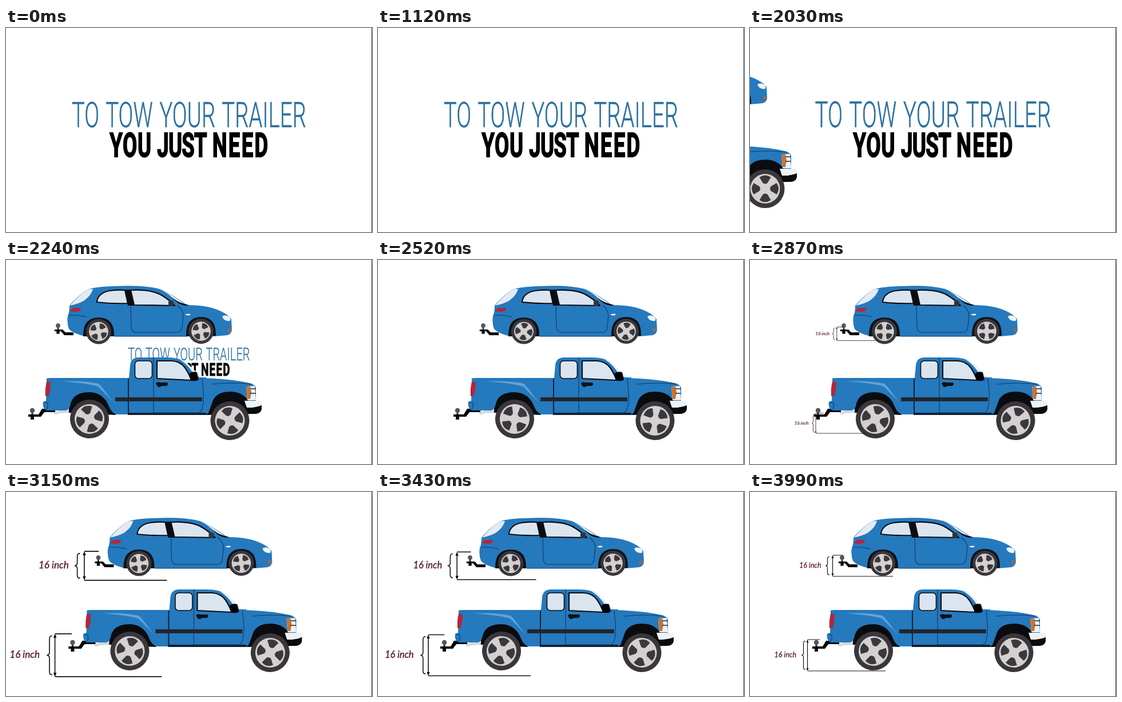
Recreate the animation shown at these times as an HTML page. Size 640 px wide and 358 px high, loop 4060 ms.

```html
<!DOCTYPE html>
<html lang="en">
<head>
<meta charset="utf-8">
<title>Tow your trailer</title>
<style>
  html, body { margin: 0; width: 100%; height: 100%; overflow: hidden; background: #fff; }
  svg { display: block; width: 100vw; height: 100vh; }
  .light, .bold { font-family: Roboto, "Liberation Sans", sans-serif; text-anchor: middle; }
  .light { font-size: 62px; font-weight: 300; letter-spacing: .2px; word-spacing: 3.7px;
    fill: #2a709f; stroke: #2a709f; stroke-width: .6; }
  .bold { font-size: 59px; font-weight: 700; letter-spacing: 1px; stroke: #000; stroke-width: 1.8; }
  .tight { letter-spacing: -1.2px; }
  .loose { letter-spacing: 3.7px; }
  .label { font: italic 12.5px Lato, "Open Sans", sans-serif; fill: #561a30; stroke: #561a30; stroke-width: .25; }
  .rule { fill: none; stroke: #111; stroke-width: 1.2; }
  .blue { fill: #2579bd; }
  .glass { fill: #dbe5f0; }
  .framed { stroke: #0c0d10; stroke-width: 2.2; stroke-linejoin: round; }
  .seam { fill: none; stroke: #123a60; stroke-width: 1.1; }
  .lamp { fill: #b3263c; }
</style>
</head>
<body>
<svg viewBox="0 0 640 358">
  <defs>
    <path id="hole" d="M-4-10L-10-20Q0-27 10-20L4-10Q0-7-4-10Z" fill="#3b383d"/>
    <g id="wheel">
      <circle r="34" fill="#39363c"/>
      <circle r="26" fill="#d3d0cf"/>
      <use href="#hole"/>
      <use href="#hole" transform="rotate(90)"/>
      <use href="#hole" transform="rotate(180)"/>
      <use href="#hole" transform="rotate(270)"/>
    </g>
    <g id="hitch">
      <path d="M-7 8H7V11H3V16H-3V11H-7Z"/>
      <rect x="-1.6" y="2" width="3.2" height="7" fill="#333"/>
      <circle r="4.3" fill="#55565a"/>
    </g>
  </defs>

  <g id="title">
    <text class="light" transform="translate(320 174) scale(.615 1)">TO TOW YOUR TRAILER</text>
    <text class="bold" transform="translate(321 225.5) scale(.62 1)">YOU <tspan class="tight">JUST</tspan> <tspan class="loose">NEED</tspan></text>
  </g>

  <g id="vehicles">
    <g id="car">
      <use href="#hitch" transform="translate(161 115) scale(.9)"/>
      <path d="M156 122H169L174 127H188V132H172L166 125H156Z"/>
      <path class="blue" d="M181 80Q193 65 212 52Q225 47 258 46Q310 43 339 51Q364 62 386 79Q424 79 446 90Q460 97 464 104L465 123Q464 130 457 132L434 134H208Q187 129 180 121Q176 110 178 98Q181 92 181 80Z"/>
      <path d="M205 134Q204 101 232 101T259 134ZM385 134Q384 100 411 100T437 133Z" fill="#101216"/>
      <path d="M182 80Q194 65 212 52Q219 50 222 51Q219 62 207 71Q197 77 182 80Z" fill="#e4eaf3"/>
      <path class="lamp" d="M182 90Q183 84 192 84Q200 83 201 86Q200 91 190 91Z"/>
      <path class="glass framed" d="M229 73Q231 58 251 54Q266 52 278 53L283 76Q255 77 229 74Z"/>
      <path class="glass framed" d="M288 53Q326 51 344 63Q357 71 365 80L294 79Z"/>
      <path d="M278 52H288L294 80H283Z" fill="#0c0d10"/>
      <path d="M338 51Q362 61 384 79Q372 76 362 67Q350 56 338 51Z" fill="#e6edf4"/>
      <path d="M361 66Q372 76 390 79L384 80Q370 78 361 66Z"/>
      <rect x="354" y="71" width="9" height="10" rx="3" fill="#34353a"/>
      <path class="seam" d="M288 80L289 118Q290 127 298 127H370Q377 127 378 117L380 98Q379 86 370 80M180 97Q194 96 211 100M260 134H386"/>
      <path d="M383 96Q388 93 393 95L391 97Q387 98 383 96Z" fill="#f5f5f5"/>
      <path d="M448 99Q454 95 461 100Q464 105 461 107Q451 108 448 99Z" fill="#f1f4f7"/>
      <path d="M456 121L464 119V125L458 126Z" fill="#8a6a62"/>
      <g class="roll" data-x="232" data-y="125.5" data-r="22" data-phase="37"><use href="#wheel"/></g>
      <g class="roll" data-x="411" data-y="125" data-r="22" data-phase="37"><use href="#wheel"/></g>
    </g>

    <g id="truck">
      <use href="#hitch" transform="translate(116 264)"/>
      <path d="M109 271H127L133 261H156V267H137L131 275H109Z"/>
      <path d="M153 268L164 264H182V268L162 269L157 272Z" fill="#d5d7da"/>
      <path d="M180 268Q178 229 216 229Q254 230 262 272ZM420 272Q428 226 466 228Q500 228 506 252L517 254V262Q515 270 505 270Z" fill="#0b0c0f"/>
      <path class="blue" d="M141 208Q142 207 150 207H285L287 185Q288 172 301 171H350Q373 171 383 179L413 207Q465 209 491 215Q505 217 507 224V247H494Q483 231 462 231Q435 231 430 252L424 268Q422 271 414 271H263Q254 268 250 257Q241 233 216 232Q188 232 183 252Q181 264 174 264H141Q133 260 135 249L140 247Z"/>
      <path d="M165 213Q205 211 232 217Q239 224 249 238L258 250Q248 239 231 222Q205 215 165 213Z" fill="#62a3da"/>
      <path class="lamp" d="M141 214H148Q148 231 144 239H139Q138 225 141 214Z"/>
      <path class="seam" d="M135 250H142Q145 256 141 262M412 208Q419 220 417 250M429 218Q468 214 500 218"/>
      <path d="M285 208V268H420V272H283V208Z" fill="#0d2034"/>
      <path class="blue" d="M286 206H420V268H288Z"/>
      <path class="seam" d="M328 171V268M328 268H407Q417 265 415 230L413 208"/>
      <rect x="295.5" y="177" width="30" height="31" rx="6" class="glass framed" style="stroke-width:1.6"/>
      <path class="glass framed" d="M334 177H360Q375 178 383 189Q390 199 394 211L334 208Z"/>
      <path d="M374 175Q381 176 389 183L412 206Q403 206 398 200Q388 183 374 175Z" fill="#e8eef5"/>
      <path d="M391 199Q395 195 404 197L407 210Q401 214 393 211Z"/>
      <path d="M332 216Q335 213 340 215H352Q355 219 350 221H342Q338 225 334 221Z" fill="#101114"/>
      <rect x="261" y="241" width="152" height="7" fill="#20262d"/>
      <path d="M490 222L505 221L507 246H492Z" fill="#eef2f5"/>
      <path d="M490 222H497L499 232L497 244H492Z" fill="#c87332"/>
      <path d="M497 226H507M497 234H507" stroke="#22272c" stroke-width="1.3"/>
      <path d="M487 247H514Q517 247 517 251V255Q505 260 491 259Z" fill="#f0f1f2"/>
      <path d="M491 259Q507 260 517 255L515 266L507 270H494Z" fill="#090a0c"/>
      <g class="roll" data-x="216" data-y="279" data-r="34" data-phase="13"><use href="#wheel"/></g>
      <g class="roll" data-x="461.5" data-y="282" data-r="34" data-phase="13"><use href="#wheel"/></g>
    </g>
  </g>

  <g id="sizes"></g>
  <path d="M639.5 0V358" stroke="#4a4a4a"/>
</svg>

<script>
  const LOOP = 4060, STEP = 70;
  const $ = id => document.getElementById(id);

  // Each key is [time, value]
  const shiftKeys = [[1960, -545], [2030, -435], [2100, -320], [2170, -190], [2240, -70], [2310, 20],
    [2380, 48], [2450, 42], [2520, 23], [2590, 13], [2660, 8], [2870, 3], [3200, 0]];
  const titleKeys = [[1610, 1], [2030, 1.007], [2100, 1], [2170, .82], [2240, .52], [2310, .2], [2380, 0]];

  function valueAt(keys, t) {
    if (t <= keys[0][0]) return keys[0][1];
    const i = keys.findIndex(k => k[0] >= t);
    if (i < 0) return keys[keys.length - 1][1];
    const [t0, a] = keys[i - 1], [t1, b] = keys[i];
    return a + (b - a) * (t - t0) / (t1 - t0);
  }

  function part(t, from, to) {
    return Math.min(1, Math.max(0, (t - from) / (to - from)));
  }

  function sizeScale(t) {
    const grow = Math.sin(part(t, 2715, 3230) * Math.PI / 2);
    const settle = (1 - Math.cos(part(t, 3260, 3780) * Math.PI)) / 2;
    return 1.41 * grow - .41 * settle;
  }

  // Height mark: label, brace, arrow and two rules around a scaling centre
  function addSize({ x, y, half, label, brace, arrow, top, bottom }) {
    const b = half - 2.5, m = brace + 3.5;
    const g = document.createElementNS("http://www.w3.org/2000/svg", "g");
    g.innerHTML = `
      <text class="label" x="${label}" y="3.5">16 inch</text>
      <path class="rule" d="M${brace + 7} ${-b}Q${m} ${-b} ${m} ${4 - b}V-4Q${m} 0 ${brace} 0Q${m} 0 ${m} 4V${b - 4}Q${m} ${b} ${brace + 7} ${b}"/>
      <path class="rule" d="M${arrow} ${-half}H${top}M${arrow} ${half}H${bottom}M${arrow} ${3 - half}V${half - 3}"/>
      <path d="M${arrow} ${-half}l2 5h-4zM${arrow} ${half}l2-5h-4z"/>`;
    $("sizes").append(g);
    return { g, x, y };
  }

  const sizes = [
    addSize({ x: 165, y: 129.5, half: 18.5, label: -79, brace: -33, arrow: -20.5, top: -2, bottom: 85 }),
    addSize({ x: 141, y: 286.5, half: 27.5, label: -98.5, brace: -51, arrow: -40.5, top: -19, bottom: 96 })
  ];
  const wheels = [...document.querySelectorAll(".roll")];

  function draw(t) {
    const shift = valueAt(shiftKeys, t);
    $("vehicles").setAttribute("transform", `translate(${shift} 0)`);
    for (const w of wheels) {
      const { x, y, r, phase } = w.dataset;
      const turn = +phase + shift / r * 180 / Math.PI;
      w.setAttribute("transform", `translate(${x} ${y}) rotate(${turn}) scale(${r / 34})`);
    }

    const zoom = valueAt(titleKeys, t);
    $("title").setAttribute("transform", `translate(319.5 178) scale(${zoom}) translate(-319.5 -178)`);
    $("title").style.display = zoom > 0 ? "" : "none";

    const s = sizeScale(t);
    $("sizes").style.display = s > 0 ? "" : "none";
    for (const { g, x, y } of sizes) g.setAttribute("transform", `translate(${x} ${y}) scale(${s})`);
  }

  let start;
  function tick(now) {
    start ??= now;
    draw(Math.floor((now - start) % LOOP / STEP) * STEP);
    requestAnimationFrame(tick);
  }
  draw(0);
  requestAnimationFrame(tick);
</script>
</body>
</html>
```
